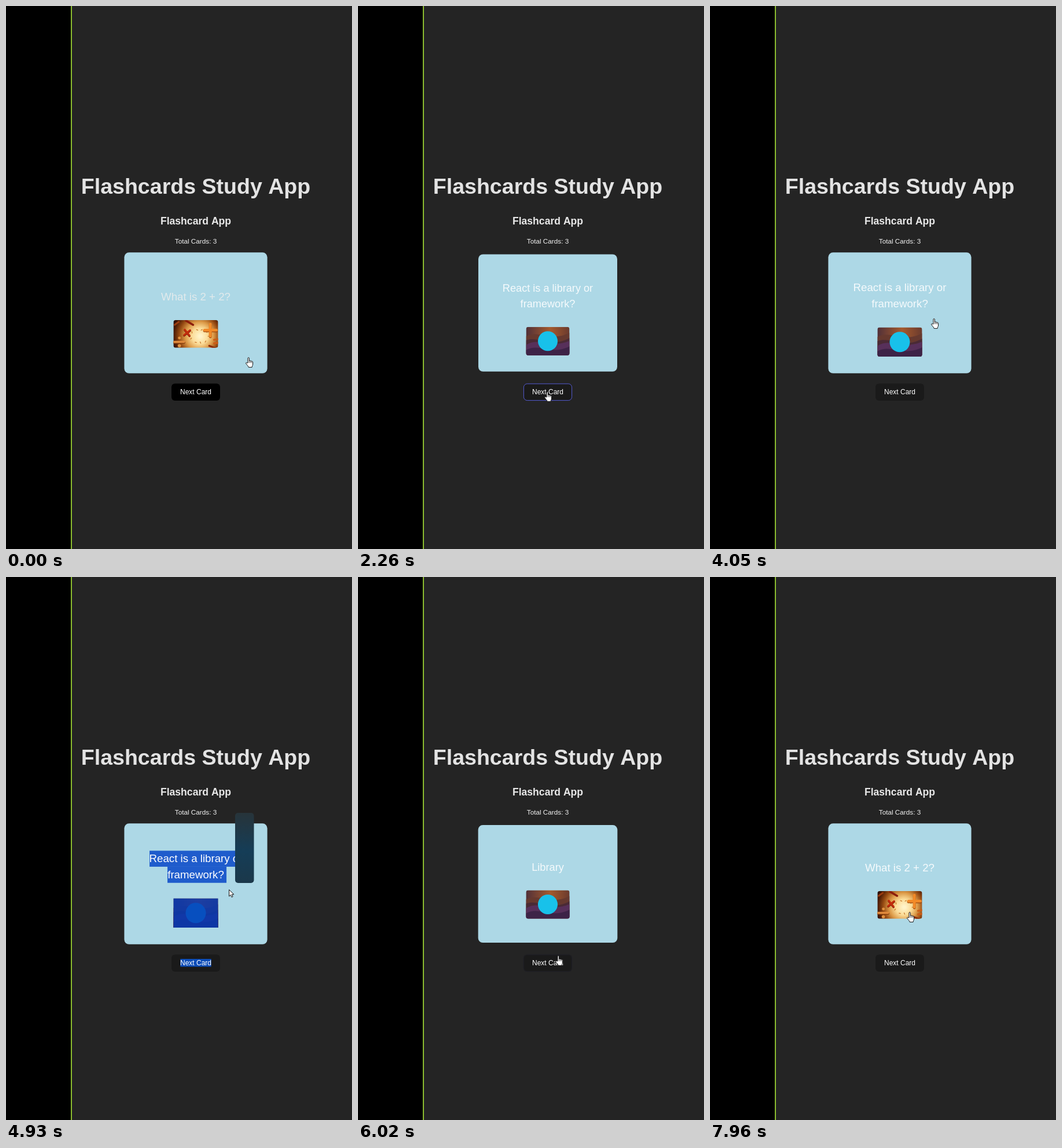
Recreate the animation shown at these times as an HTML page with a canvas. Size 598 by 937 pixels, loop 8 s.

```html
<!DOCTYPE html>
<html lang="en">
<head>
<meta charset="utf-8">
<title>Flashcards Study App</title>
<style>
html, body { margin: 0; width: 100%; height: 100%; overflow: hidden; background: #242424; }
canvas { display: block; width: 598px; height: 937px; }
</style>
</head>
<body>
<canvas id="stage"></canvas>
<script>
const W = 598, H = 937, LOOP = 8000;
const CX = 328, CY = 529.6;
const canvas = document.getElementById('stage');
const ctx = canvas.getContext('2d');
const dpr = window.devicePixelRatio || 1;
canvas.width = W * dpr;
canvas.height = H * dpr;

// Card faces: text lines with baselines, picture top and height, relative to the card centre.
const faces = {
  sum:    { lines: [['What is 2 + 2?', -21]], top: 12, h: 46.4, draw: mathPicture },
  four:   { lines: [['4', -21]], top: 12, h: 46.4, draw: mathPicture },
  react:  { lines: [['React is a library or', -36.1], ['framework?', -9.5]], top: 24.2, h: 49, draw: reactPicture },
  answer: { lines: [['Library', -22.3]], top: 10.8, h: 49, draw: reactPicture }
};

// Each entry changes only the properties it names; the rest carry over.
const steps = [
  [0,    { x: 414, y: 606, arrow: false, face: 'sum', scale: 1.03, ink: '#e2eaec', button: '#000', ring: null, selected: false, ghost: 0 }],
  [840,  { face: 'four', ink: '#f5fafc' }],
  [1430, { x: 411, face: 'sum' }],
  [1580, { x: 355, y: 627 }],
  [1730, { x: 325, y: 662, scale: 1.001, button: '#1a1a1a', ring: '#34376c' }],
  [1880, { x: 323, y: 665, scale: 1, ring: '#575ed8' }],
  [2000, { x: 322, ring: '#646cff' }],
  [2260, { face: 'react' }],
  [2380, { ring: '#fff' }],
  [2640, { x: 330, y: 655 }],
  [2790, { x: 372, y: 585, scale: 1.01 }],
  [2940, { x: 382, y: 539, scale: 1.028 }],
  [3060, { scale: 1.03, ring: null }],
  [3180, { face: 'answer' }],
  [4050, { face: 'react' }],
  [4630, { face: 'answer' }],
  [4930, { x: 385, y: 539, arrow: true, face: 'react', selected: true, ghost: 1 }],
  [5200, { x: 399, y: 643, ghost: 0.85 }],
  [5350, { x: 400, y: 622, ghost: 0 }],
  [5610, { x: 400, y: 607, arrow: false, face: 'answer', selected: false }],
  [5760, { x: 402, y: 618 }],
  [5880, { x: 379, y: 626 }],
  [6020, { x: 341, y: 653, scale: 1.003, ring: '#20202a' }],
  [6160, { y: 652, scale: 1, ring: '#575ed8' }],
  [6280, { ring: '#646cff' }],
  [6420, { face: 'four', ring: '#fff' }],
  [6680, { x: 360, y: 590, scale: 1.01 }],
  [6800, { x: 369, y: 540, scale: 1.022 }],
  [6920, { x: 371, y: 509, scale: 1.027 }],
  [7070, { x: 373, y: 495, scale: 1.03 }],
  [7190, { y: 483 }],
  [7440, { ring: null }],
  [7560, { face: 'sum' }],
  [7810, { x: 375, y: 503 }],
  [7960, { x: 340, y: 578 }]
];

function stateAt(t) {
  const s = {};
  for (const [at, change] of steps) if (at <= t) Object.assign(s, change);
  return s;
}

function box(x, y, w, h, r, fill) {
  ctx.beginPath();
  ctx.roundRect(x, y, w, h, r);
  if (fill) {
    ctx.fillStyle = fill;
    ctx.fill();
  }
}

function disc(x, y, r, fill) {
  ctx.beginPath();
  ctx.arc(x, y, r, 0, Math.PI * 2);
  ctx.fillStyle = fill;
  ctx.fill();
}

function label(text, x, y, size, fill, weight = '') {
  ctx.font = `${weight} ${size}px "Liberation Sans", Arial, sans-serif`;
  ctx.fillStyle = fill;
  ctx.textAlign = 'center';
  ctx.fillText(text, x, y);
}

function bar(x1, y1, x2, y2, width, color) {
  ctx.beginPath();
  ctx.moveTo(x1, y1);
  ctx.lineTo(x2, y2);
  ctx.lineWidth = width;
  ctx.strokeStyle = color;
  ctx.stroke();
}

// Two crossed bars; the offset copy underneath gives them depth.
function cross(x, y, dx, dy, width, color, shade) {
  for (const [shift, tone] of [[1, shade], [0, color]]) {
    bar(x - dx, y - dy + shift, x + dx, y + dy + shift, width, tone);
    bar(x + dy, y - dx + shift, x - dy, y + dx + shift, width, tone);
  }
}

// Pictures are drawn in a 75 px wide frame whose origin is its top left corner.
function mathPicture(h) {
  const glow = ctx.createRadialGradient(45, 27, 2, 42, 26, 47);
  glow.addColorStop(0, '#fff3c8');
  glow.addColorStop(0.25, '#fbdc98');
  glow.addColorStop(0.48, '#dc9a48');
  glow.addColorStop(0.7, '#964a12');
  glow.addColorStop(0.88, '#4d1c06');
  glow.addColorStop(1, '#2a0c03');
  ctx.fillStyle = glow;
  ctx.fillRect(0, 0, 75, h);
  ctx.lineCap = 'round';
  bar(21, 1, 33, 8, 3.5, '#8c1d0c');
  bar(2, 8, 9, 3, 3, '#9a3c10');
  for (let i = 0; i < 9; i++) {
    const a = i * 0.72, x = 44 + 14 * Math.cos(a), y = 27 + 12 * Math.sin(a);
    bar(x, y, x + 2.5 * Math.cos(a * 3), y + 2.5 * Math.sin(a * 3), 1.2, '#c9792c');
  }
  cross(23, 21, 4, 5, 3.2, '#c22c0c', '#701405');
  cross(62, 17, 10, 0, 4.6, '#f28a28', '#8e3a08');
  bar(1, 37.5, 18, 37.5, 4, '#7d3608');
  bar(1, 36.5, 18, 36.5, 3.6, '#e08a3c');
  disc(10, 30, 2.4, '#e2923f');
  disc(10, 43, 2.7, '#e2923f');
  bar(68, 33, 75, 32, 3, '#cc5c16');
  bar(68, 39, 75, 38, 3, '#cc5c16');
  bar(60, 43, 70, 47, 3, '#8e2c0a');
}

function wave(y, lift, drop, h, color) {
  ctx.beginPath();
  ctx.moveTo(0, y);
  ctx.bezierCurveTo(22, y - lift, 43, y + drop, 75, y - lift / 2);
  ctx.lineTo(75, h);
  ctx.lineTo(0, h);
  ctx.fillStyle = color;
  ctx.fill();
}

function reactPicture(h) {
  const sky = ctx.createLinearGradient(0, 0, 75, 0);
  sky.addColorStop(0, '#513038');
  sky.addColorStop(0.55, '#a45a2e');
  sky.addColorStop(1, '#6a3a2e');
  ctx.fillStyle = sky;
  ctx.fillRect(0, 0, 75, h);
  wave(16, 12, 11, h, '#66392f');
  wave(23, 8, 14, h, '#4a2a35');
  wave(31, 14, 7, h, '#57305a');
  wave(40, 13, 10, h, '#3d2347');
  disc(37.5, 24.5, 17, '#18c1ea');
}

function drawPicture(face, selected) {
  ctx.save();
  ctx.translate(-37.5, face.top);
  box(0, 0, 75, face.h, selected ? 0 : 4);
  ctx.clip();
  face.draw(face.h);
  if (selected) {
    ctx.fillStyle = 'rgba(4,58,184,0.84)';
    ctx.fillRect(0, 0, 75, face.h);
  }
  ctx.restore();
}

function drawCard(s) {
  const face = faces[s.face];
  ctx.save();
  ctx.translate(CX, CY);
  ctx.scale(s.scale, s.scale);
  box(-120, -101.2, 240, 202.4, 8, '#add8e6');
  if (s.selected) {
    ctx.fillStyle = '#1f5ccc';
    ctx.fillRect(-77.6, -55.6, 155, 26.8);
    ctx.fillRect(-47.5, -28.8, 99, 27);
  }
  for (const [text, y] of face.lines) label(text, 0, y, 18.15, s.selected ? '#fff' : s.ink);
  drawPicture(face, s.selected);
  ctx.restore();
}

function drawButton(s) {
  box(286, 651.5, 84, 29.5, 6, s.button);
  if (s.ring) {
    const w = s.ring === '#fff' ? 1.6 : 0.8;
    box(286 + w / 2, 651.5 + w / 2, 84 - w, 29.5 - w, 6);
    ctx.lineWidth = w;
    ctx.strokeStyle = s.ring;
    ctx.stroke();
  }
  if (s.selected) {
    ctx.fillStyle = '#0b4cb8';
    ctx.fillRect(301.3, 659, 53.4, 13.5);
  }
  label('Next Card', CX, 669.5, 12, '#fff');
}

function drawGhost(alpha) {
  const shade = ctx.createLinearGradient(0, 407, 0, 528);
  shade.addColorStop(0, '#27343a');
  shade.addColorStop(0.55, '#153d57');
  shade.addColorStop(1, '#1b384a');
  ctx.globalAlpha = alpha;
  box(396, 407, 32.5, 121, 5, shade);
  ctx.globalAlpha = 1;
}

const hand = new Path2D('M4 10V1.8C4 .2 6.4 .2 6.4 1.8V6.5C7 5.5 8.5 5.8 8.6 6.9C9.3 6 10.6 6.4 10.7 7.6C11.5 6.9 12.6 7.3 12.6 8.6V12C12.6 14 11.3 15 11.1 17.4H5.2C5 15.4 2.4 13.5 .8 11C0 9.7 1.5 8.7 2.5 9.7Z');
const knuckles = new Path2D('M6.4 6.5V10M8.6 7V10M10.7 7.8V10.2');
const arrow = new Path2D('M.6 .6V12L3.3 9.5L5 13.5L7 12.6L5.3 8.8H9Z');

function drawCursor(s) {
  ctx.save();
  ctx.translate(s.x, s.y);
  ctx.lineJoin = 'round';
  ctx.lineWidth = 1;
  ctx.fillStyle = '#fff';
  ctx.strokeStyle = '#111';
  const shape = s.arrow ? arrow : hand;
  ctx.fill(shape);
  ctx.stroke(shape);
  if (!s.arrow) {
    ctx.lineWidth = 0.7;
    ctx.stroke(knuckles);
  }
  ctx.restore();
}

function draw(t) {
  const s = stateAt(t);
  ctx.setTransform(dpr, 0, 0, dpr, 0, 0);
  ctx.fillStyle = '#242424';
  ctx.fillRect(0, 0, W, H);
  ctx.fillStyle = '#000';
  ctx.fillRect(0, 0, 112, H);
  ctx.fillStyle = '#8bbd2f';
  ctx.fillRect(112, 0, 2, H);
  label('Flashcards Study App', CX, 323.8, 37.55, '#e3e3e3', 'bold');
  label('Flashcard App', CX, 376.6, 17.6, '#e8e8e8', 'bold');
  label('Total Cards: 3', CX, 410.2, 11.75, '#f4f4f4');
  drawCard(s);
  drawButton(s);
  if (s.ghost) drawGhost(s.ghost);
  drawCursor(s);
}

const start = performance.now();
function frame() {
  draw((performance.now() - start) % LOOP);
  requestAnimationFrame(frame);
}
frame();
</script>
</body>
</html>
```
